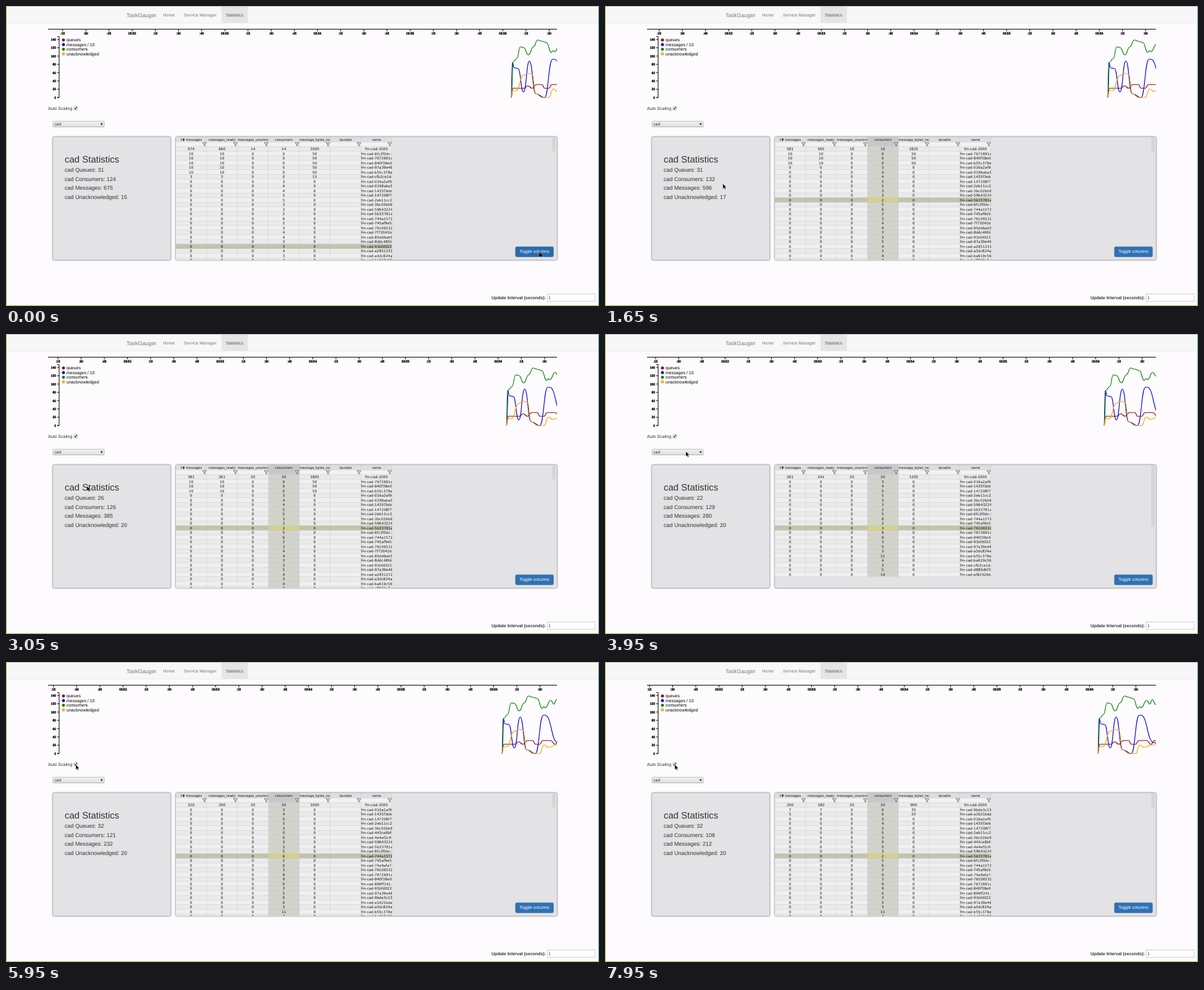
An HTML page that plays this animation: 960 px wide and 485 px high, repeating every 8 s.

```html
<!DOCTYPE html>
<html lang="en">
<head>
<meta charset="utf-8">
<title>Queue statistics</title>
<style>
  html, body { margin: 0; width: 100%; height: 100%; overflow: hidden; background: #fdfbfd; }
  svg { display: block; }
  text { font: 7px "Liberation Sans", Arial, sans-serif; fill: #333; text-rendering: geometricPrecision; white-space: pre; }
  .nav { fill: #777; }
  .mid { text-anchor: middle; }
  .axis text { font-size: 5px; fill: #000; stroke: #000; stroke-width: .4; }
  .axis path { fill: none; stroke: #000; }
  .legend text { fill: #000; }
  .stats text { font-size: 9px; }
  .grid text { font: 5.75px "DejaVu Sans", sans-serif; fill: #111; }
  .grid .head { font-size: 5.2px; }
  .series path { fill: none; stroke-width: 1.15; stroke-linejoin: round; }
  .panel { fill: #e3e2e4; stroke: #bdbcbe; stroke-width: .5; filter: drop-shadow(0 .8px 1px #0009); }
</style>
</head>
<body>
<svg width="960" height="485" viewBox="0 0 960 485">
  <defs>
    <clipPath id="plot"><rect x="68" y="38" width="824" height="112"/></clipPath>
    <linearGradient id="face" x2="0" y2="1"><stop stop-color="#f4f4f4"/><stop offset="1" stop-color="#dcdcdc"/></linearGradient>
  </defs>
  <rect width="960" height="27" fill="#f8f7f8"/>
  <rect y="27" width="960" height=".6" fill="#e2e1e2"/>
  <rect x="349" y="1" width="42.5" height="26" fill="#e6e5e6"/>
  <text class="nav" x="195" y="17.7" style="font-size:9px">TaskGauger</text>
  <text class="nav" x="254.5" y="17">Home</text>
  <text class="nav" x="288" y="17">Service Manager</text>
  <text class="nav" x="356" y="17" style="fill:#555">Statistics</text>

  <g class="axis">
    <path d="M68 37.5H892"/>
    <g id="times"></g>
    <g id="scale"></g>
  </g>
  <g class="legend" id="legend"></g>
  <g clip-path="url(#plot)"><g class="series" id="series"></g></g>

  <text x="68" y="168.3">Auto Scaling</text>
  <rect x="109.8" y="162.6" width="5.6" height="5.6" rx="1" fill="#f3f3f3" stroke="#999" stroke-width=".6"/>
  <path d="M111 165.3l1.4 1.6 2.5-4" fill="none" stroke="#333" stroke-width="1.1"/>
  <rect x="76" y="186.3" width="83" height="9.2" rx="1" fill="url(#face)" stroke="#a5a5a5" stroke-width=".7"/>
  <text x="78.5" y="193.3" style="font-size:6.7px">cad</text>
  <path d="M152.8 189.5h4l-2 3.4z" fill="#333"/>

  <rect class="panel" x="76" y="211.5" width="190.5" height="199" rx="2"/>
  <rect class="panel" x="275" y="211.5" width="617" height="199" rx="2"/>
  <g class="stats">
    <text x="95" y="252.5" style="font-size:15px">cad Statistics</text>
    <g id="stats"></g>
  </g>
  <svg class="grid" id="grid" x="275" y="211.8" width="350" height="198.6"></svg>
  <rect id="thumb" x="885.3" y="213.5" width="3.6" rx="1" fill="#d9d8da" stroke="#bbb" stroke-width=".5"/>
  <rect id="button" x="824.8" y="389.2" width="61.5" height="16.3" rx="2" stroke="#2765a2" stroke-width=".5"/>
  <text x="831" y="399.3" style="fill:#fff">Toggle columns</text>

  <text x="786" y="473.8" style="font-weight:bold">Update Interval (seconds):</text>
  <rect x="876.3" y="465.5" width="77.5" height="12" fill="#fff" stroke="#bbb" stroke-width=".7"/>
  <text x="878" y="474">1</text>

  <g id="mouse" stroke="#fff" stroke-width=".35">
    <path id="arrow" d="M0 0V8L1.9 6.3 3.2 9.2 4.5 8.6 3.2 5.8H5.7z"/>
    <path id="hand" d="M-.5 0Q.6-1 1.2 0V3L4.2 3.7V6.5L3.2 8.5H-.4L-2 5.2-1.6 4.2-.5 5z"/>
  </g>
  <path d="M0 .5H960" stroke="#b9b8a4"/>
  <path d="M.5 0V484.5H960" fill="none" stroke="#aaa748"/>
  <path d="M959.5 0V484" stroke="#4c9e9c"/>
</svg>
<script>
const LOOP = 8000, STEP = 50, SPEED = 2.5, ROW = 7.5, COL = 50, TOP = 15.5;
const $ = id => document.getElementById(id);
const label = (x, y, s, cls = '') => `<text x="${x}" y="${y}" class="${cls}">${s}</text>`;
const box = (x, y, w, h, fill) => `<rect x="${x}" y="${y}" width="${w}" height="${h}" fill="${fill}"/>`;
const current = (list, t) => list.filter(e => e[0] <= t).pop();

// Turning points of each curve; the line eases from one to the next.
const series = [
  ['queues', 'darkred', '0,148 3,133 21,133 27,129 34,133 41,127 50,127 54,133 61,133 66,127 79,127 86,133 92,127 99,127'],
  ['messages / 10', 'mediumblue', '0,148 2,91 5,100 11,101 20,139 29.5,89 40,142 54,148 67,86 70,86 90,130 98,133'],
  ['consumers', 'green', '0,148 3.5,90 9,85 15,66 20,67 28,79 36,66 43,55 50,57 57,59 65,75 68,72 70,74 79,62 84,68 88,61 94,69'],
  ['unacknowledged', 'orange', '0,148 2,137 8,137 20,112 28,109 34,110 40,142 50,148 61,148 68,134 75,138 88,134 98,134']
];
const easedPath = points => points.split(' ').map(p => p.split(',').map(Number)).reduce((d, [x, y], i, all) => {
  if (!i) return `M${x} ${y}`;
  const [px, py] = all[i - 1], mid = (px + x) / 2;
  return `${d}C${mid} ${py} ${mid} ${y} ${x} ${y}`;
}, '');

// Each queue: id, consumers, then optionally a backlog and when it starts and ends.
const group = (from, until, text) => text.split(', ').map(s => {
  const [id, consumers, backlog = 0, start = 0, end = 0] = s.split(' ');
  return { id, consumers: +consumers, backlog: +backlog, start: +start, end: +end, from, until };
});
const queues = [
  ...group(0, LOOP, '016a2af9 3, 1435f3eb 4, 147208f7 5, 2eb11cc2 5, 3bc02bb9 3, 59643224 3, 5b33781a 2, 6fc2f0dc 5 10 0 600, ' +
    '744a1572 6, 745af9e5 2, 76106532 3, 7672691c 9 10 0 3800, 840f38e0 9 10 0 3800, 91bfd022 3, 97a39e46 5 10 0 600, ' +
    'a3dc824a 3, b55c378e 11 10 0 3800, ba619c56 4, cfb2ce1d 3 3 0 600, d880dbf3 5, ef82426b 14'),
  ...group(0, 3800, '0198aba5 4, 7f72041b 4, 85dd6ab5 4, 8ddc48fd 3, a2851231 4, cf8bf4c7 3'),
  ...group(5150, LOOP, '443ce8bf 0, 4e4ef2c9 0, 74a9afa7 0, 899ff241 0, 9bde3c23 0 7 6450 8000, a1621bda 0 5 6450 8000')
];
const headings = ['1▼ messages', 'messages_ready', 'messages_unacknowledged', 'consumers', 'message_bytes_ready', 'durable', 'name'];

// time, queues, consumers, messages, ready messages of the main queue
const updates = [
  [0, 31, 124, 675, 660], [600, 31, 132, 596, 565], [1800, 29, 121, 490, 479], [2900, 26, 126, 385, 361],
  [3800, 22, 129, 280, 241], [5150, 22, 125, 240, 200], [5550, 32, 121, 232, 200], [6450, 32, 108, 212, 180]
];
// time, highlighted row, highlighted column
const hovers = [[0, 21, -1], [850, 10, 4], [1500, 11, 3]];
// start, end, x, y of each mouse move
const moves = [[0, 0, 864, 397], [300, 900, 514, 306], [1200, 1800, 131, 284], [2700, 3500, 131, 190],
  [4500, 5050, 128.5, 185], [5050, 5600, 113, 166]];

function rowsAt(t, ready, unacked) {
  const alive = queues.filter(q => t >= q.from && t < q.until).map(q => {
    const waiting = t >= q.start && t < q.end;
    return { name: `fm-cad-${q.id}-1`, ready: waiting ? q.backlog : 0, unacked: 0, consumers: waiting ? 0 : q.consumers };
  });
  alive.sort((a, b) => b.ready - a.ready || (a.name < b.name ? -1 : 1));
  return [{ name: 'fm-cad-1000', ready, unacked, consumers: unacked }, ...alive];
}

function drawGrid(rows, [, hotRow, hotCol]) {
  const bottom = TOP + rows.length * ROW, hotX = hotCol * COL, hotY = TOP + hotRow * ROW;
  let out = box(0, 0, 350, 8, '#dedddf') + box(0, 8, 350, 7.5, '#f3f2f3');
  rows.forEach((_, i) => out += box(0, TOP + i * ROW, 350, ROW, i % 2 ? '#f1f0f1' : '#ebeaeb'));
  if (hotCol >= 0) out += box(hotX, 0, COL, TOP, '#c8c8c9') + box(hotX, TOP, COL, bottom - TOP, '#d2d4cb');
  out += box(0, hotY, 350, ROW, '#c3c3ad');
  if (hotCol >= 0) out += box(hotX, hotY, COL, ROW, '#d3d18c');
  let lines = '';
  for (let c = 1; c <= 7; c++) lines += `M${c * COL - .3} 0V${bottom}`;
  for (let y = 8; y <= bottom; y += ROW) lines += `M0 ${y}H350`;
  out += `<path d="${lines}" stroke="#bcbbbd" stroke-width=".35"/>`;
  headings.forEach((h, c) => {
    const long = h.length > 15;
    out += `<svg x="${c * COL}" width="49.6" height="16">${label(long ? .3 : 24.8, 6.4, h, long ? 'head' : 'head mid')}
      <path d="M43.2 9.2h6.2l-2.3 2.7v2.6l-1.5-.7v-1.9z" fill="#eee" stroke="#333" stroke-width=".65"/></svg>`;
  });
  rows.forEach(({ name, ready, unacked, consumers }, i) => {
    const y = 21.3 + i * ROW;
    [ready + unacked, ready, unacked, consumers, ready * 5].forEach((v, c) => out += label(c * COL + 24.7, y, v, 'mid'));
    out += i ? label(299.7, y, name) : label(324.7, y, name, 'mid');
  });
  $('grid').innerHTML = out;
  $('thumb').setAttribute('height', bottom > 198 ? 21 : 98);
}

function drawTimes(shift) {
  let out = '';
  for (let i = 1; i < 24; i++) {
    const x = 54.3 + i * 37.5 - shift, quarter = i % 4;
    if (x < 68 || x > 892) continue;
    out += `<path d="M${x} 38v3"/>` + label(x, 45.8, quarter ? ':' + quarter * 15 : '03:' + (51 + i / 4), 'mid');
  }
  $('times').innerHTML = out;
}

function mouseAt(t) {
  const i = moves.indexOf(current(moves, t));
  const [start, end, x, y] = moves[i], [, , px, py] = moves[Math.max(0, i - 1)];
  const k = Math.min(1, (t - start) / (end - start || 1)), e = k * k * (3 - 2 * k);
  return [px + (x - px) * e, py + (y - py) * e];
}

let scale = '<path d="M83 49.5H86V148H83"/>';
for (let v = 0; v <= 140; v += 20) {
  const y = 148 - v * .671;
  scale += `<path d="M83 ${y}h3"/><text x="81" y="${y + 1.9}" text-anchor="end">${v}</text>`;
}
$('scale').innerHTML = scale;
$('legend').innerHTML = series.map(([name, color], i) =>
  `<circle cx="93" cy="${55 + i * 7.5}" r="2.4" fill="${color}"/>` + label(98, 57.3 + i * 7.5, name)).join('');
$('series').innerHTML = series.map(([, color, points]) => `<path d="${easedPath(points)}" stroke="${color}"/>`).join('');

let shownUpdate, shownHover;
function drawData(t) {
  const update = current(updates, t), hover = current(hovers, t);
  if (update === shownUpdate && hover === shownHover) return;
  shownUpdate = update;
  shownHover = hover;
  const growth = 2 * updates.indexOf(update);
  const [, queueCount, consumers, messages, ready] = update;
  drawGrid(rowsAt(t, ready, Math.min(20, 14 + growth)), hover);
  const stats = { Queues: queueCount, Consumers: consumers, Messages: messages, Unacknowledged: Math.min(20, 15 + growth) };
  $('stats').innerHTML = Object.entries(stats)
    .map(([name, count], i) => label(95, 268 + i * 14.55, `cad ${name}: ${count}`)).join('');
}

function draw(now) {
  const t = Math.floor(now % LOOP / STEP) * STEP, shift = t / 1000 * SPEED;
  drawTimes(shift);
  drawData(t);
  $('series').setAttribute('transform', `translate(${817.8 - shift})`);
  const [x, y] = mouseAt(t), over = x > 825 && y > 389;
  $('mouse').setAttribute('transform', `translate(${x} ${y})`);
  $('hand').style.display = over ? '' : 'none';
  $('arrow').style.display = over ? 'none' : '';
  $('button').setAttribute('fill', over ? '#296bac' : '#2f71b3');
}
function tick() {
  draw(performance.now());
  requestAnimationFrame(tick);
}
tick();
</script>
</body>
</html>
```
